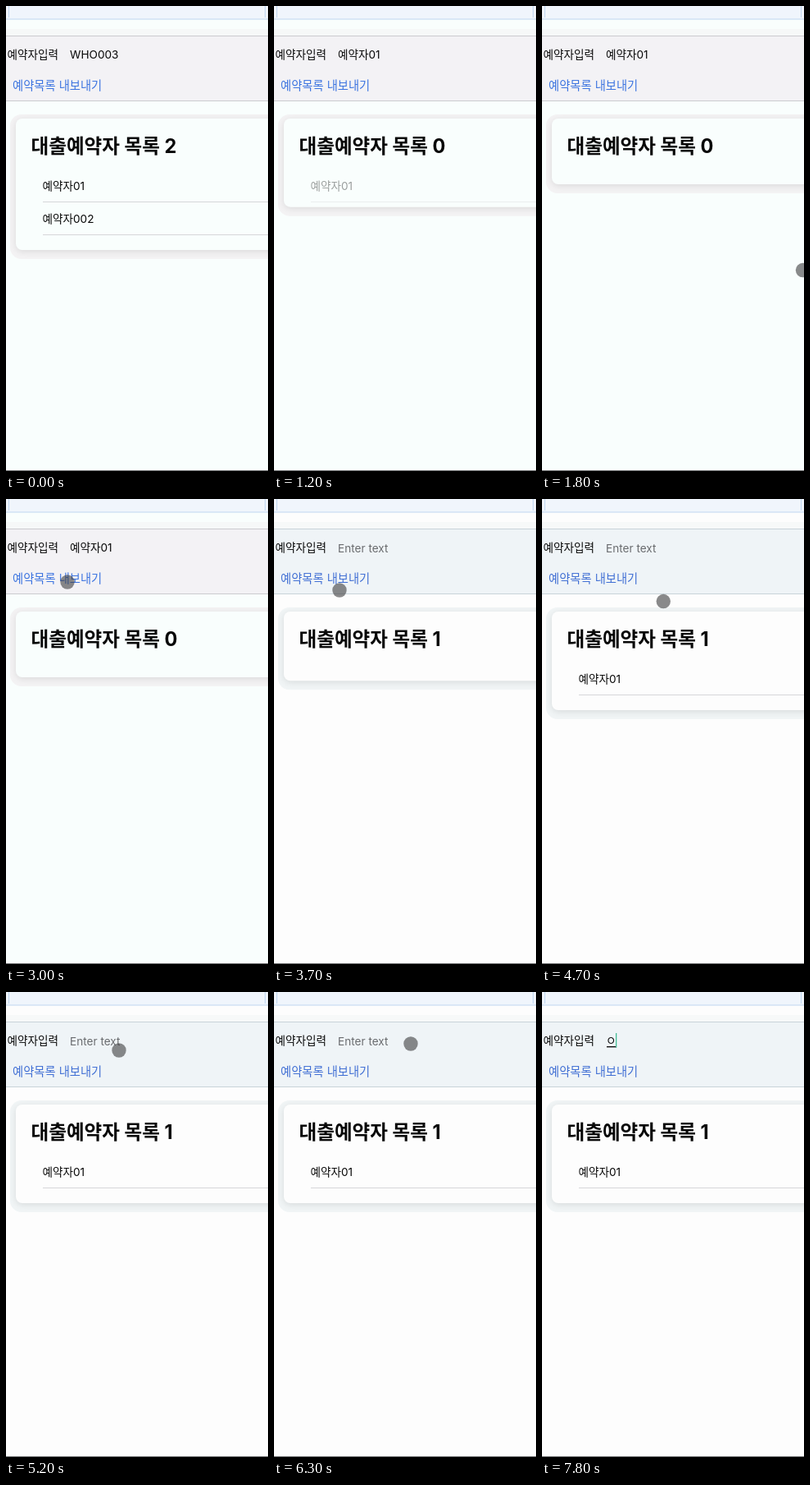
Write an HTML page that moves like this. It is 320 by 566 pixels and loops after 8000 ms.

```html
<!DOCTYPE html>
<html lang="ko">
<head>
<meta charset="utf-8">
<style>
  html, body { margin: 0; width: 100%; height: 100%; overflow: hidden; }
  svg { display: block; width: 320px; height: 566px;
        --page: #f9fefd; --bar: #f3f2f5; --edge: #cbcbcf; --halo: #f4f3f4; --link: #3c74e0; }
  svg.cool { --page: #fdfdfd; --bar: #eff4f7; --edge: #c8d3d9; --halo: #f1f5f6; --link: #406fd4; }
  text { font: 13.6px Inter, "Noto Sans CJK KR", sans-serif; fill: #080808; white-space: pre; }
  #title { font-size: 23.6px; font-weight: 700; }
  #link { font-size: 14.3px; fill: var(--link); }
  #card { fill: var(--page); filter: drop-shadow(0 2px 4px rgba(0, 0, 0, .1)); }
</style>
</head>
<body>
<svg id="stage" viewBox="0 0 320 566">
  <rect width="320" height="566" fill="var(--page)"/>
  <rect width="320" height="16" fill="#f0f5fc"/>
  <path d="M0 16H320M3.5 0V14M316.5 0V14" stroke="#bed6f0" fill="none"/>
  <rect y="28" width="320" height="8" fill="var(--halo)" opacity=".5"/>
  <rect y="36" width="320" height="80" fill="var(--bar)"/>
  <path d="M0 36.5H320M0 115.5H320" stroke="var(--edge)"/>

  <text x="1.5" y="64">예약자입력</text>
  <text id="field" x="78"></text>
  <rect id="mark" x="79" y="66" width="12" height="1.4" fill="#111"/>
  <rect id="caret" y="50" width="1.3" height="17.5" fill="#43bd96"/>
  <text id="link" x="8" y="101.5">예약목록 내보내기</text>

  <rect id="halo" x="5" y="132" width="340" rx="14" fill="var(--halo)"/>
  <rect id="card" x="12" y="137" width="340" rx="8"/>
  <text id="title" x="30.5" y="179"></text>
  <g class="row">
    <text x="44.5" y="224">예약자01</text>
    <path d="M45 238.5H320" stroke="#d6d6d9"/>
  </g>
  <g class="row">
    <text x="44.5" y="263.5">예약자002</text>
    <path d="M45 278.5H320" stroke="#d6d6d9"/>
  </g>

  <circle id="pointer" r="8.7" fill="#3c3c3e" fill-opacity=".6"/>
  <rect y="565" width="320" height="1" fill="#77797a"/>
</svg>
<script>
const LOOP = 8000;
const $ = id => document.getElementById(id);
const rows = document.querySelectorAll('.row');

// Pointer stops: time, x, y
const stops = [
  [1800, 319, 322], [2000, 222, 236], [2200, 132, 151], [2500, 75, 101],
  [3400, 75, 101], [3500, 80, 111], [4050, 80, 111], [4300, 118, 144],
  [4600, 155, 138], [4900, 135, 98], [5200, 138, 71], [5500, 143, 72],
  [5650, 143, 72], [6000, 167, 63], [7700, 167, 63]
];

const clamp = v => Math.max(0, Math.min(1, v));
const ramp = (t, from, to) => clamp((t - from) / (to - from));
const ease = p => p * p * (3 - 2 * p);

function pointerAt(t) {
  const i = stops.findIndex(s => s[0] > t);
  if (i < 1) return stops[i < 0 ? stops.length - 1 : 0].slice(1);
  const [a, b] = [stops[i - 1], stops[i]];
  const p = ramp(t, a[0], b[0]);
  return [1, 2].map(k => a[k] + (b[k] - a[k]) * p);
}

function fieldAt(t) {
  if (t < 700) return 'WHO003';
  if (t < 1100) return 'Enter text';
  if (t < 3700) return '예약자01';
  return t < 7700 ? 'Enter text' : 'ㅇ';
}

function setField(t) {
  const value = fieldAt(t), typing = t >= 7700;
  const empty = value === 'Enter text';
  $('field').textContent = value;
  $('field').style.fill = empty ? '#6a6c6f' : '#080808';
  $('field').setAttribute('y', empty ? 64.6 : 64.2);
  $('mark').style.opacity = +typing;
  const blinkOn = t >= 5800 && Math.floor((t - 5800) / 500) % 2 === 0;
  $('caret').style.opacity = +(typing || blinkOn);
  $('caret').setAttribute('x', typing ? 90 : 77.8);
}

function setList(t) {
  const removed = ease(ramp(t, 1050, 1300));
  const added = ease(ramp(t, 3650, 3900));
  const size = 2 * (1 - removed) + added;
  $('title').textContent = '대출예약자 목록 ' + (t < 1100 ? 2 : t < 3700 ? 0 : 1);
  $('card').setAttribute('height', 80 + 40 * size);
  $('halo').setAttribute('height', 96 + 40 * size);
  rows.forEach((row, i) => row.style.opacity = ramp(size - i, 0.5, 1));
}

function setPointer(t) {
  const [x, y] = pointerAt(t);
  $('pointer').setAttribute('cx', x);
  $('pointer').setAttribute('cy', y);
  $('pointer').style.opacity = t < 1800 ? 0 : 1 - ramp(t, 7690, 7790);
}

function draw(now) {
  const t = now % LOOP;
  $('stage').classList.toggle('cool', t >= 3700);
  setField(t);
  setList(t);
  setPointer(t);
  requestAnimationFrame(draw);
}
draw(performance.now());
</script>
</body>
</html>
```
